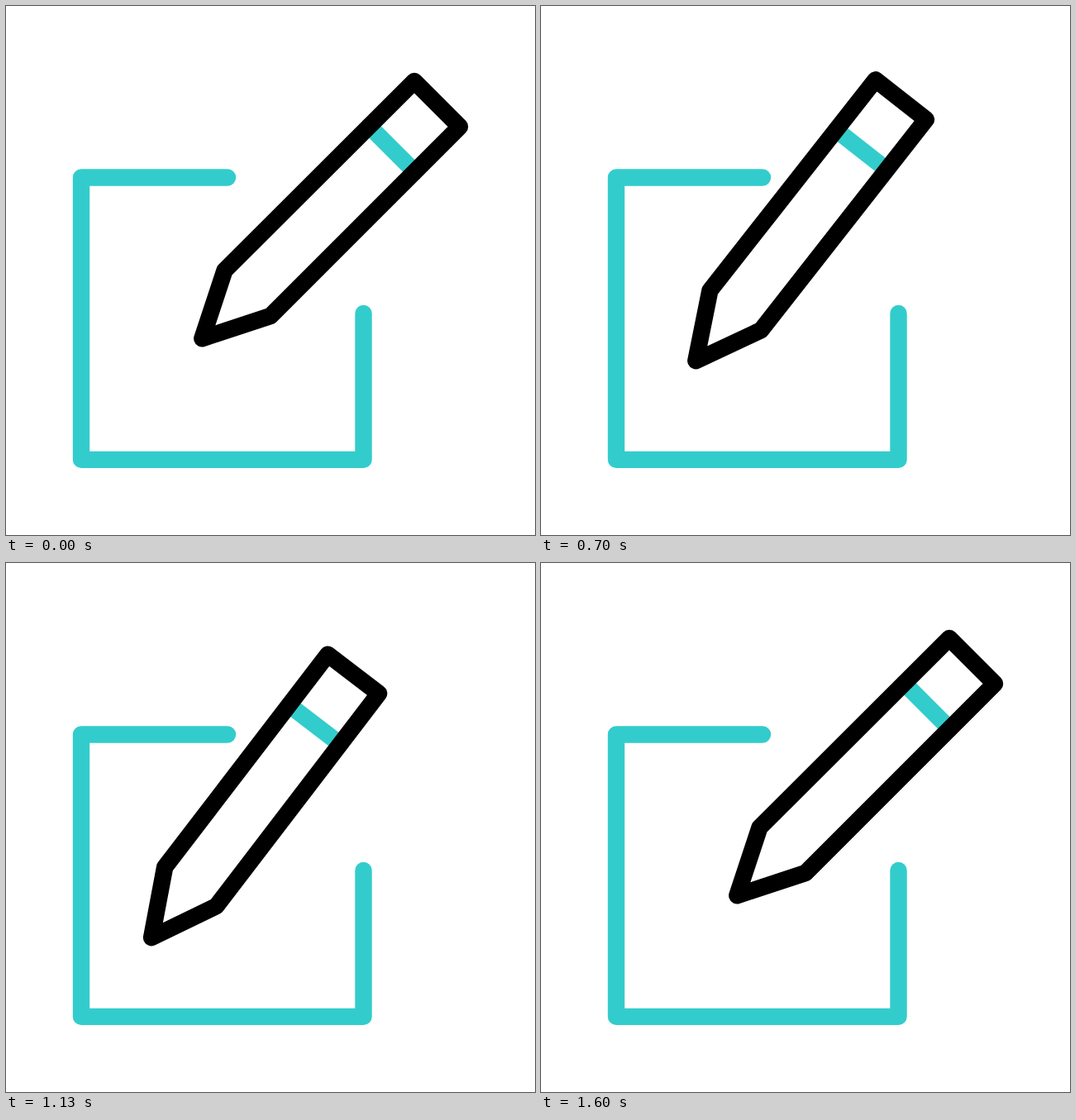
An HTML page that plays this animation: 640x640 px, repeating every 2000 ms.

```html
<!DOCTYPE html>
<html lang="en">
<head>
<meta charset="utf-8">
<title>Pencil writing</title>
<style>
  html, body { margin: 0; height: 100%; overflow: hidden; background: #fff; }
  svg { display: block; width: 100%; height: 100%; }
  path { fill: none; stroke: #000; stroke-width: 20.4; stroke-linecap: round; stroke-linejoin: round; }
  .teal { stroke: #33cccc; }
</style>
</head>
<body>
<svg viewBox="0 0 640 640">
  <path class="teal" d="M268 207.5H91V548.9H432.5V372"/>
  <g id="pencil">
    <path class="teal" d="M439.5 145.5L494.5 200.5"/>
    <path d="M494 91L549 146L320 375L237.3 402.3L264.5 320Z"/>
  </g>
</svg>
<script>
const LOOP = 2000, FPS = 30, PIVOT = "393 246.5";

// Poses of the scribble: time in steps, offset and tilt from rest
const poses = [
  { at: 0, x: 0, y: 0, tilt: 0 },
  { at: 14, x: 43, y: -11.5, tilt: 18.1 },
  { at: 24, x: -98.5, y: 21.9, tilt: -13.8 },
  { at: 29, x: -27, y: 85, tilt: 0 },
  { at: 38.5, x: -124.3, y: -19, tilt: -14.1 },
  { at: 48, x: 0, y: 0, tilt: 0 }
];

// Curve handle of a pose, parallel to the line between its neighbours
function handle(i, axis) {
  const before = poses[Math.max(0, i - 1)], after = poses[Math.min(poses.length - 1, i + 1)];
  return (after[axis] - before[axis]) / 6;
}

// Smooth path from pose i to the next one
function curve(i) {
  const from = poses[i], to = poses[i + 1];
  const path = document.createElementNS("http://www.w3.org/2000/svg", "path");
  path.setAttribute("d", `M${from.x} ${from.y}
    C${from.x + handle(i, "x")} ${from.y + handle(i, "y")}
    ${to.x - handle(i + 1, "x")} ${to.y - handle(i + 1, "y")} ${to.x} ${to.y}`);
  return path;
}

const ease = u => u * u * (3 - 2 * u);
const curves = poses.slice(1).map((_, i) => curve(i));
const pencil = document.getElementById("pencil");

function draw() {
  const time = performance.now() % LOOP;
  const step = Math.min(48, Math.floor(time * FPS / 1000 + 0.15));
  const i = Math.max(0, poses.findIndex(pose => pose.at >= step) - 1);
  const from = poses[i], to = poses[i + 1];
  const progress = ease((step - from.at) / (to.at - from.at));
  const { x, y } = curves[i].getPointAtLength(progress * curves[i].getTotalLength());
  const tilt = from.tilt + (to.tilt - from.tilt) * progress;
  pencil.setAttribute("transform", `translate(${x} ${y}) rotate(${tilt} ${PIVOT})`);
  requestAnimationFrame(draw);
}
draw();
</script>
</body>
</html>
```
